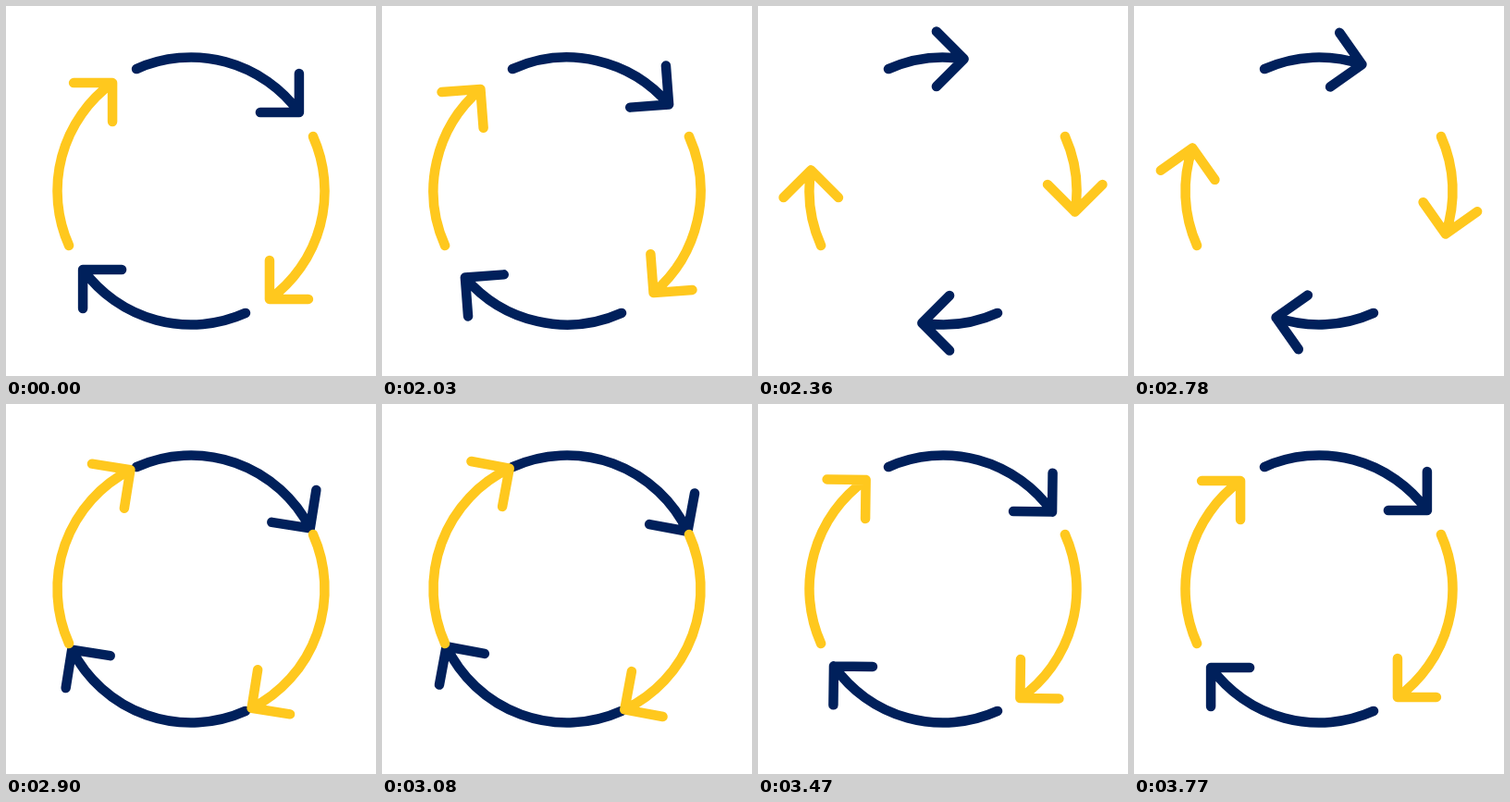
These frames come from a looping animation (400x400 px, 3.83 s). An HTML page:

```html
<!DOCTYPE html>
<html lang="en">
<head>
<meta charset="utf-8">
<title>Circling arrows</title>
<style>
  html, body { margin: 0; width: 100%; height: 100%; overflow: hidden; background: #fff; }
  svg { display: block; width: 100%; height: 100%; }
  path { fill: none; stroke-width: 10.5; stroke-linecap: round; stroke-linejoin: round; }
</style>
</head>
<body>
<svg viewBox="0 0 400 400">
  <g id="arrows" transform="translate(200 200)"></g>
</svg>
<script>
const LOOP = 3830, STEP = 30, START = 2000, END = 3770;
const RADIUS = 144.5, LEG = 42;
const TAIL = -24.1, REST = 54, LOW = -2, PEAK = 66.5;
const HEAD_LAG = 9;
const NAVY = '#00205b', GOLD = '#ffc81e';

const arrows = [[0, NAVY], [180, NAVY], [90, GOLD], [270, GOLD]].map(([turn, color]) => {
  const path = document.createElementNS('http://www.w3.org/2000/svg', 'path');
  path.setAttribute('transform', `rotate(${turn})`);
  path.setAttribute('stroke', color);
  document.getElementById('arrows').append(path);
  return path;
});

// Angles are clockwise degrees from the top of the ring.
const rad = deg => deg * Math.PI / 180;
const onRing = deg => [RADIUS * Math.sin(rad(deg)), -RADIUS * Math.cos(rad(deg))];
const fmt = ([x, y]) => `${x.toFixed(2)} ${y.toFixed(2)}`;

const easeInOut = (x, power) =>
  x < 0.5 ? 0.5 * (2 * x) ** power : 1 - 0.5 * (2 - 2 * x) ** power;

// Pull back, shoot past the resting point, then settle.
function tipAngle(t) {
  const back = 606, shoot = 400, settle = 103;
  if (t <= 0 || t >= END - START) return REST;
  if (t < back) return REST + (LOW - REST) * Math.sin(t / back * Math.PI / 2);
  t -= back;
  if (t < shoot) return LOW + (PEAK - LOW) * easeInOut(t / shoot, 3.6);
  const u = (t - shoot) / settle;
  return REST + (PEAK - REST) * (1 + u) * Math.exp(-u);
}

function arrowPath(angle) {
  const tip = onRing(angle);
  const legEnd = side => {
    const a = rad(angle - HEAD_LAG + 180 + side * 45);
    return [tip[0] + LEG * Math.cos(a), tip[1] + LEG * Math.sin(a)];
  };
  return `M${fmt(onRing(TAIL))}A${RADIUS} ${RADIUS} 0 0 1 ${fmt(tip)}` +
    `M${fmt(legEnd(-1))}L${fmt(tip)}L${fmt(legEnd(1))}`;
}

function render(ms) {
  const t = Math.floor((ms % LOOP - START) / STEP) * STEP;
  const d = arrowPath(tipAngle(t));
  for (const path of arrows) path.setAttribute('d', d);
}

const origin = performance.now();
function tick() {
  render(performance.now() - origin);
  requestAnimationFrame(tick);
}
tick();
</script>
</body>
</html>
```
